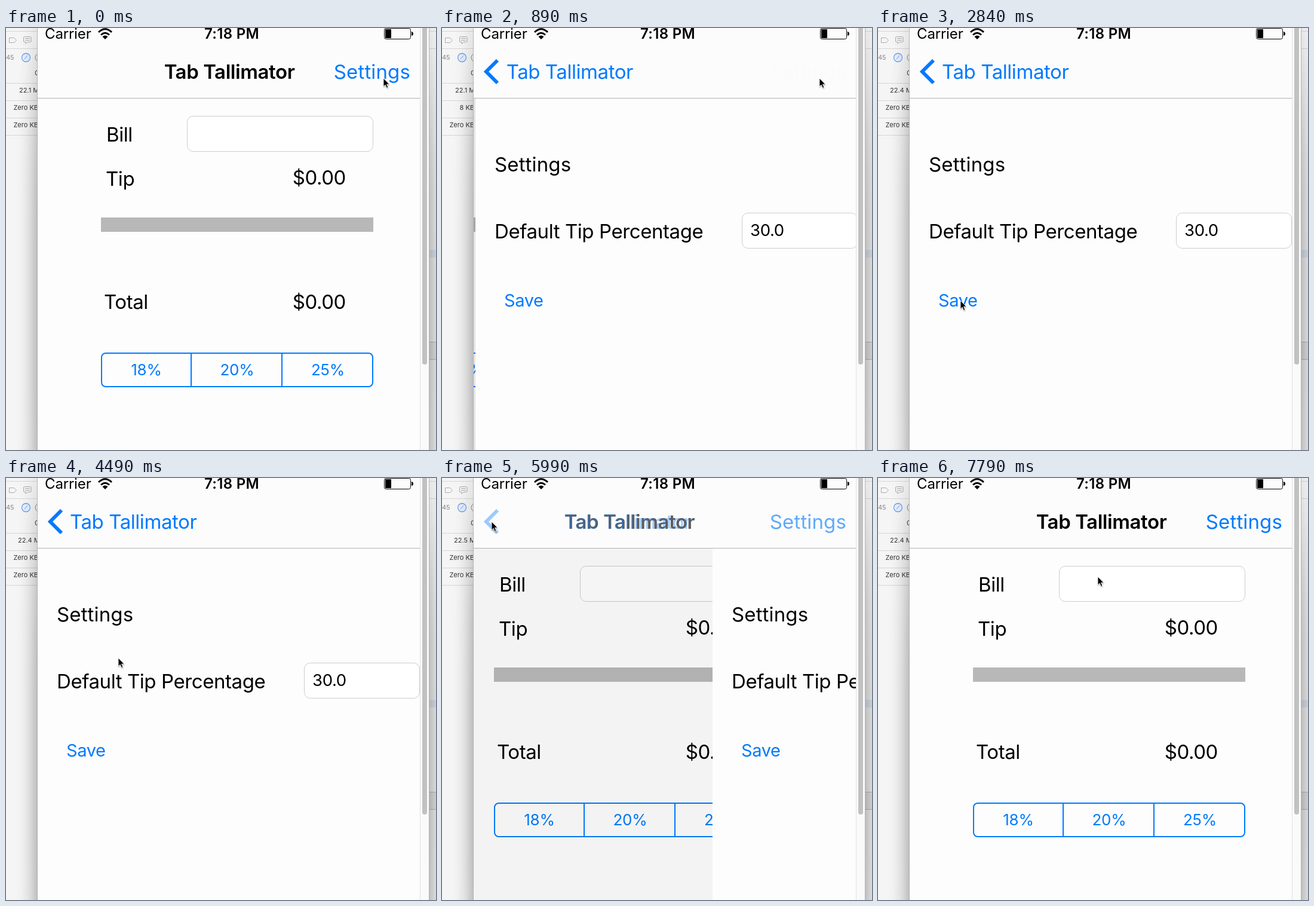
Write an HTML page that moves like this. It is 720x706 px and loops after 8000 ms.

```html
<!DOCTYPE html>
<html lang="en">
<head>
<meta charset="utf-8">
<title>Tip screens</title>
<style>
  html, body { margin: 0; width: 100%; height: 100%; overflow: hidden; background: #f5f5f5; }
  svg { display: block; width: 100%; height: 100%; }
  text { font: 33px Inter, "Open Sans", sans-serif; letter-spacing: -.013em; white-space: pre; }
  .blue { fill: #007aff; }
  .bold { font-weight: 600; }
  .wide { letter-spacing: .004em; }
  .status { font-size: 24px; letter-spacing: -.006em; }
  .clock { letter-spacing: .012em; }
  .segment { font-size: 26px; letter-spacing: -.01em; text-anchor: middle; }
  .small { font-size: 11px; letter-spacing: 0; fill: #333; }
  .line { fill: none; stroke: #d6d6d6; }
  .field { fill: #fff; stroke: #ccc; }
  .outline { fill: none; stroke: #007aff; stroke-width: 2; }
</style>
</head>
<body>
<svg viewBox="0 0 720 706" preserveAspectRatio="none">
  <defs>
    <clipPath id="screen"><path d="M53 0H693V706H53z"/></clipPath>
    <filter id="blur" x="-10%" y="-50%" width="120%" height="200%">
      <feGaussianBlur stdDeviation="17 120"/>
    </filter>
    <filter id="soft" x="-50%" y="-50%" width="200%" height="200%">
      <feGaussianBlur stdDeviation="1"/>
    </filter>
  </defs>

  <!-- window behind -->
  <path fill="#f5f5f5" d="M0 0H720V706H0z"/>
  <path class="line" d="M0 5.5H53M0 34.5H53M0 92.5H53M0 121.5H53M0 150.5H53M0 179.5H53M708 5.5H720M708 34.5H720"/>
  <g fill="none" stroke="#aaa">
    <path d="M5.500 16.500H13.500L17.500 20.500 13.500 24.500H5.500z"/>
    <path d="M31.500 14.500H40.500Q42 14.500 42 16V22Q42 23.500 40.500 23.500H36L33 26.500V23.500H31Q29.500 23.500 29.500 22V16Q29.500 14.500 31.500 14.500M32 17.500H39.500M32 20.500H39.500"/>
    <circle cx="56" cy="49.500" r="7" stroke="#888"/>
    <g stroke="#6d9ee8"><circle cx="33.500" cy="49.500" r="7" fill="#e4eefc" stroke-width="1.300"/><path d="M31 52L36 46"/></g>
  </g>
  <text class="small" x="0" y="53" style="fill:#888">45</text>
  <text class="small" x="48" y="79">0</text>
  <text class="small" id="memory" y="108"></text>
  <text class="small" id="disk" x="54" y="137" text-anchor="end"></text>
  <text class="small" x="54" y="166" text-anchor="end">Zero KB</text>
  <path fill="#e0e8f4" d="M708 371H720V384H708z"/>
  <path fill="#e6e6e6" stroke="#bbb" d="M707 525.500H721V554.500H707z"/>

  <!-- simulator window -->
  <rect x="53" y="80" width="655" height="800" opacity=".48" filter="url(#blur)"/>
  <path fill="#b5b5b5" d="M52 0H709V706H52z"/>
  <path fill="#fafafa" d="M53 0H708V706H53z"/>
  <path fill="#e2e2e2" d="M693 0H694V706H693z"/>
  <rect x="697" y="-10" width="8" height="573" rx="4" fill="#c1c1c1"/>

  <g clip-path="url(#screen)">
    <path fill="#fdfdfd" d="M53 0H693V706H53z"/>
    <g id="home">
      <text x="168" y="190">Bill</text>
      <rect class="field" x="303.500" y="147.500" width="311" height="59" rx="10"/>
      <text x="167" y="264">Tip</text>
      <text x="569" y="262" text-anchor="end">$0.00</text>
      <path fill="#b8b8b8" d="M159 317H615V341H159z"/>
      <text x="164" y="470">Total</text>
      <text x="569" y="470" text-anchor="end">$0.00</text>
      <rect class="outline" x="160" y="544" width="454" height="56" rx="7"/>
      <path class="outline" d="M310 544V600M462 544V600"/>
      <text class="blue segment" x="235" y="581">18%</text>
      <text class="blue segment" x="387" y="581">20%</text>
      <text class="blue segment" x="539" y="581">25%</text>
    </g>
    <path id="dim" d="M53 118H693V706H53z"/>
    <g id="settings">
      <path fill="#fdfdfd" d="M53 118H693V706H53z"/>
      <text class="wide" x="85" y="240">Settings</text>
      <text x="85" y="352">Default Tip Percentage</text>
      <rect class="field" x="499.500" y="309.500" width="193" height="59" rx="10"/>
      <text x="513" y="348" style="font-size:27.5px">30.0</text>
      <text class="blue" id="save" x="101" y="466" style="font-size:29px">Save</text>
    </g>

    <!-- navigation and status bars -->
    <path fill="#fcfcfc" d="M53 0H693V117H53z"/>
    <path fill="#b2b2b2" d="M53 117H693V118H53z"/>
    <text class="bold" id="title" y="85" text-anchor="middle">Tab Tallimator</text>
    <text class="blue wide" id="link" x="677" y="85" text-anchor="end">Settings</text>
    <g id="back">
      <path d="M93 54L74 73 93 92" fill="none" stroke="#007aff" stroke-width="6"/>
      <text class="blue" id="backLabel" y="85">Tab Tallimator</text>
    </g>
    <text class="status" x="65" y="18">Carrier</text>
    <g fill="none" stroke="#000" stroke-width="3">
      <path d="M155 7Q166 -3.500 177 7M159 11.500Q166 5 173 11.500"/>
      <path fill="#000" stroke="none" d="M161.500 14.500Q166 10.500 170.500 14.500L166 19z"/>
    </g>
    <text class="status bold clock" x="378" y="18" text-anchor="middle">7:18 PM</text>
    <rect x="633.500" y=".5" width="44" height="18" rx="3" fill="none" stroke="#000"/>
    <path d="M635 2H645V17H635zM679 6Q682 6.500 682 9.500T679 13z"/>
  </g>

  <g id="cursor">
    <path d="M0 2V16L3.500 13 6 18 8.500 17 6 12H11z" opacity=".35" filter="url(#soft)"/>
    <path d="M0 0V14L3.200 11.200 5.500 16.400 7.900 15.400 5.600 10.200H10z" stroke="#fff" stroke-width=".9"/>
  </g>
</svg>
<script>
const LOOP = 8000, PUSH = 474, POP = 5874, STIFFNESS = 0.01825;
const el = id => document.getElementById(id);
const parts = Object.fromEntries(
  ["home", "settings", "dim", "title", "link", "back", "backLabel", "save", "memory", "disk", "cursor"]
    .map(id => [id, el(id)]));

// time, x, y of the pointer tip
const pointerPath = [
  [0, 632, 84], [1190, 632, 84], [2240, 164, 457], [2690, 138, 456], [4190, 138, 456],
  [4490, 188, 301], [4640, 190, 79], [5540, 83, 73], [6290, 83, 73], [6890, 368, 169],
  [7040, 368, 168], [7490, 368, 168], [7790, 368, 165], [LOOP, 368, 165]
];

const clamp = v => Math.min(1, Math.max(0, v));
const mix = (a, b, k) => a + (b - a) * k;
const shift = (node, x, y = 0) => node.setAttribute("transform", `translate(${Math.round(x)} ${Math.round(y)})`);
const fade = (node, opacity) => node.setAttribute("opacity", opacity);

function tick(t) {
  if (t < 320) return 0;
  if (t < 590) return 320;
  return 290 + 150 * Math.floor((t - 290) / 150);
}

// Critically damped spring from 0 to 1
function spring(ms) {
  const s = Math.max(0, ms) * STIFFNESS;
  return 1 - (1 + s) * Math.exp(-s);
}

function pointer(t) {
  const i = pointerPath.findIndex(key => key[0] > t);
  const [t0, x0, y0] = pointerPath[i - 1], [t1, x1, y1] = pointerPath[i];
  const k = (t - t0) / (t1 - t0), eased = k * k * (3 - 2 * k);
  return [mix(x0, x1, eased), mix(y0, y1, eased)];
}

function draw(t) {
  const open = t < POP ? spring(t - PUSH) : 1 - spring(t - POP);
  const linkPressed = t >= 320 && t < PUSH;
  const backPressed = t >= 5640 && t < POP;
  const saveFade = t < 3740 ? 1 : mix(0.2, 1, clamp((t - 3890) / 300));

  shift(parts.home, -192 * open);
  shift(parts.settings, 640 * (1 - open));
  fade(parts.dim, 0.1 * open);
  parts.title.setAttribute("x", mix(374, 214, open));
  fade(parts.title, 1 - open);
  fade(parts.link, linkPressed ? 0.2 : 1 - open);
  parts.backLabel.setAttribute("x", mix(263, 107, open));
  fade(parts.back, backPressed ? 0.2 : open);
  fade(parts.save, saveFade);

  const amount = t < 1340 ? "22.1" : t >= 5990 && t < 7340 ? "22.5" : "22.4";
  parts.memory.textContent = amount + " M";
  parts.memory.setAttribute("x", t < 1340 ? 22 : 20);
  parts.disk.textContent = t >= 590 && t < 2390 ? "8 KB" : "Zero KB";
  shift(parts.cursor, ...pointer(t));
}

function frame() {
  draw(tick(performance.now() % LOOP));
  requestAnimationFrame(frame);
}
frame();
</script>
</body>
</html>
```
